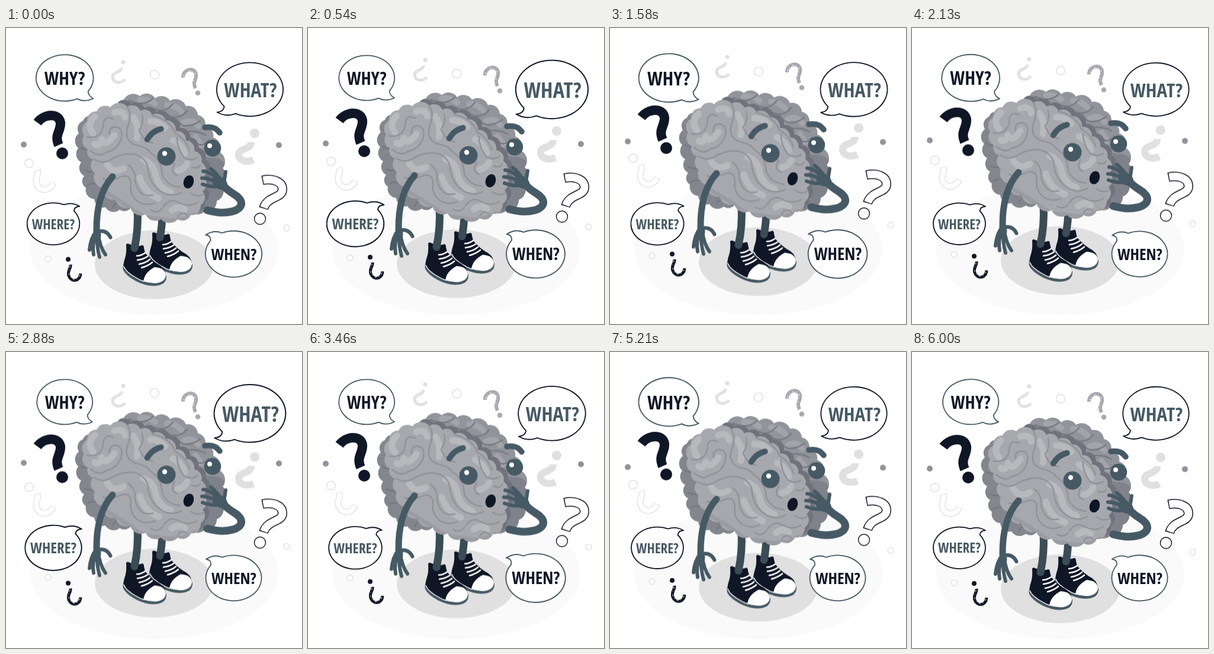
These frames come from a looping animation (500x500 px, 6.04 s). An HTML page:

```html
<!DOCTYPE html>
<html lang="en">
<head>
<meta charset="utf-8">
<title>Puzzled brain</title>
<style>
  :root { --navy: #0f1626; --slate: #455a64; --grey: #92929b; --pale: #e0e0e0; }
  html, body { margin: 0; width: 100%; height: 100%; overflow: hidden; background: #fff; }
  svg { display: block; width: 100%; height: 100%; }

  .slow, .fast { animation: float 6040ms linear -45ms infinite; }
  .fast { animation-duration: 3020ms; }
  .bubble { animation: beat 6040ms linear -45ms infinite; transform-box: fill-box; transform-origin: center; }
  .bubble.b2 { animation-duration: 3020ms; }
  .bubble.b4 { animation-duration: 1510ms; }
  @keyframes float { 50% { transform: translateY(-10px); } }
  @keyframes beat {
    0%, 30%, 40%, 60%, 100% { transform: scale(1); }
    10%, 50% { transform: scale(1.1); }
  }

  .bubble path { fill: #fff; stroke-width: 1.8; stroke-linejoin: round; }
  .bubble text { text-anchor: middle; font-family: "Open Sans Condensed", "Open Sans", "Noto Sans", sans-serif; font-weight: 700; font-stretch: 75%; }
  .navy path { stroke: var(--navy); }
  .navy text { fill: var(--slate); }
  .slate path { stroke: var(--slate); }
  .slate text { fill: var(--navy); }

  .line { fill: none; stroke-linecap: round; stroke-linejoin: round; }
  .hook { fill: none; stroke: currentColor; }
  .hollow { fill: none; stroke: #fff; stroke-dashoffset: -1.6; stroke-dasharray: 96.8 200; }
  .scratch { fill: none; stroke: #fff; stroke-width: .9; stroke-dasharray: 3 4 1 5; }
  .dot { fill: currentColor; }
  .ring { fill: #fff; stroke: currentColor; stroke-width: 1.4; }
</style>
</head>
<body>
<svg viewBox="0 0 500 500">
  <defs>
    <path id="back"/>
    <path id="side"/>
    <path id="front"/>
    <clipPath id="backClip"><use href="#back"/></clipPath>
    <clipPath id="frontClip"><use href="#front"/></clipPath>
    <g id="shoe">
      <path fill="var(--slate)" d="M202 392Q196 400 198 409Q203 419 220 428Q240 438 257 435Q272 432 271 418Z"/>
      <path fill="var(--navy)" d="M203 366Q204 363 208 365Q220 371 230 367Q233 367 233 372L235 380Q244 391 255 398Q268 404 270 416Q270 428 255 431Q238 433 220 422Q202 412 199 403Q198 397 201 389Q204 380 203 366Z"/>
      <path fill="#fff" d="M251 404Q268 405 270 417Q270 428 255 431Q243 432 232 428Q234 413 251 404Z"/>
      <path class="line" stroke="#fff" stroke-width="1.4" d="M199 403Q203 413 220 422Q226 426 233 428"/>
      <path class="line" stroke="#fff" stroke-width="2.6" d="M221 385Q228 385 235 380M222 392Q232 391 239 386M225 399Q236 397 243 391M229 405Q240 402 247 396"/>
    </g>
  </defs>

  <ellipse cx="250.5" cy="374" rx="209.5" ry="111" fill="#fafafa"/>

  <g class="slow">
    <circle class="ring" color="#e0e0e0" cx="251" cy="79" r="7.5"/>
    <circle class="dot" color="#92929b" cx="30" cy="197" r="5"/>
    <circle class="dot" color="#92929b" cx="461" cy="198" r="5"/>
    <circle class="ring" color="#e0e0e0" cx="474" cy="338" r="5"/>
    <circle class="ring" color="#e0e0e0" cx="71" cy="390" r="5"/>
  </g>

  <g class="fast" color="#e0e0e0">
    <path class="hook" stroke-width="5" d="M195 67C195 76 180 74 180 83C181 93 193 95 201 87"/>
    <path class="scratch" d="M194 68C192 75 180 75 181 83C182 92 193 93 199 88"/>
    <circle class="dot" cx="198" cy="58" r="3.6"/>
    <path class="hook" stroke-width="12" d="M414 193C414 207 394 202 393 214C393 226 408 227 418 223"/>
    <circle class="dot" cx="420" cy="178" r="8"/>
    <path class="hook" stroke-width="11" d="M53 240C56 250 47 256 53 266C59 277 74 275 80 262"/>
    <path class="hollow" stroke-width="8.4" pathLength="100" d="M53 240C56 250 47 256 53 266C59 277 74 275 80 262"/>
    <circle class="ring" cx="39" cy="229" r="7.3"/>
  </g>
  <g class="fast" color="#a8a8b0">
    <path class="hook" stroke-width="6" d="M299 84C298 70 318 65 321 78C323 88 314 89 320 102"/>
    <path class="scratch" d="M300 82C300 71 317 68 320 78C321 87 313 90 319 101"/>
    <circle class="dot" cx="324" cy="110" r="4.3"/>
  </g>
  <g class="fast" color="#0f1626">
    <path class="hook" stroke-width="16" d="M53 160C64 145 89 143 92 160C93 175 81 180 89 198"/>
    <circle class="dot" cx="95" cy="212" r="10"/>
    <path class="hook" stroke-width="16" d="M433 257.5C450 254 467 259 467 273C467 288 441 284 435 305"/>
    <path class="hollow" stroke-width="13" pathLength="100" d="M433 257.5C450 254 467 259 467 273C467 288 441 284 435 305"/>
    <circle class="ring" cx="429" cy="322.500" r="9.500"/>
    <path class="hook" stroke-width="5" d="M109 400C110 407 103 410 106 419C110 430 125 429 126 415"/>
    <path class="scratch" d="M108 402C108 408 103 411 107 419C111 428 123 427 125 417"/>
    <circle class="dot" cx="105" cy="391" r="4"/>
  </g>

  <g class="slow">
    <ellipse cx="250.500" cy="400" rx="100.500" ry="58" fill="#e0e0e0"/>
    <use href="#shoe" x="44" y="-19"/>
    <use href="#shoe"/>
    <path class="line" stroke="#3a4c55" stroke-width="13" d="M264 310Q264 335 260 354M222 305Q224 340 217 372"/>

    <use href="#back" fill="#92949b"/>
    <g clip-path="url(#backClip)">
      <path class="line" stroke="#a2a4a9" stroke-width="10" d="M226 121Q240 119 252 128M272 130Q286 130 296 141M300 160Q315 152 325 166M280 158L292 171M320 184L330 198"/>
      <path class="line" stroke="#787b83" stroke-width="2.500" d="M208 123Q232 134 248 119M250 137Q268 145 282 128M270 146Q292 158 306 140M287 153Q300 176 328 157M300 177Q320 171 337 181M316 193Q332 203 342 190M338 220Q355 222 364 236M350 275Q360 282 364 276"/>
      <path fill="#7f828a" d="M340 220Q375 215 374 250L365 300Q345 318 325 312Z"/>
      <use href="#front" x="7" y="-5" fill="#70737c"/>
    </g>

    <use href="#side" fill="#84868e"/>
    <path class="line" stroke="#73767f" stroke-width="2" d="M132 240Q144 246 150 240M138 265Q152 258 162 272M154 291Q164 280 178 288M126 202Q134 208 140 203M180 303Q185 292 196 294"/>
    <use href="#front" fill="#a7a8ad"/>
    <g clip-path="url(#frontClip)" class="line">
      <path stroke="#9b9ca2" stroke-width="7" d="M163 275Q190 290 212 305Q230 322 255 322Q295 331 318 315"/>
      <path stroke="#b8b9bd" stroke-width="11" d="M150 150Q135 164 147 178M150 196Q158 202 162 188M183 143Q199 138 201 151M215 151Q226 167 221 186M171 231Q181 247 199 237M232 223Q250 230 253 250Q258 270 278 277M226 253Q234 279 258 288M244 158Q258 157 269 169M282 190Q297 197 302 213M290 241Q301 239 306 229M280 308Q292 299 302 307M183 181Q176 192 168 194"/>
      <path stroke="#919399" stroke-width="2.500" d="M137 184Q159 188 164 168Q164 146 181 154M142 207Q158 220 169 210Q187 207 194 189Q200 169 184 167Q173 169 175 180M205 134Q213 145 207 163Q197 188 217 197Q238 201 244 211Q263 223 264 249Q274 268 294 269M149 222Q166 232 181 220Q209 207 226 217Q241 226 240 242Q245 268 266 279Q282 286 296 278M164 255Q180 259 195 251Q211 247 211 264Q208 281 222 293Q238 302 252 295M207 232Q220 242 218 259Q225 288 248 282M230 147Q234 160 225 173Q232 192 248 194M247 148Q278 155 286 178Q304 188 310 207M289 185Q288 202 301 219Q313 226 323 219M285 229Q276 244 289 249M314 235Q325 239 328 232M312 279Q323 287 334 281M266 302Q277 286 292 295Q308 304 323 295M245 308Q255 315 264 305M290 320Q296 308 306 316"/>
    </g>

    <path class="line" stroke="var(--slate)" stroke-width="9.500" d="M238.500 188.500Q247 174 262 170.500M336 168Q353 165 361 177"/>
    <circle cx="271" cy="217" r="15.500" fill="var(--slate)"/>
    <circle cx="268" cy="212" r="4.200" fill="#fff"/>
    <circle cx="349" cy="203" r="14.300" fill="var(--slate)"/>
    <circle cx="344" cy="199" r="4" fill="#fff"/>
    <ellipse cx="308.500" cy="260" rx="8.500" ry="11.300" fill="var(--navy)" transform="rotate(18 308.500 260)"/>

    <g class="line" stroke="var(--slate)">
      <path stroke-width="13" d="M340 308C372 317 402 309 397 293C393 282 378 280 367 266"/>
      <path stroke-width="6" d="M364 264Q348 243 333 242M362 263Q345 254 331 253.500M364 267Q347 270 332 264M364 258Q354 244 346 238M368 262L371 243"/>
      <path stroke-width="11" d="M180 251Q152 282 153 344"/>
      <path stroke-width="6" d="M152 344Q143 355 141 375M152 348Q145 366 148 383M154 348Q153 370 158 387M156 348Q158 369 168 383M154 344Q170 340 176.500 354"/>
    </g>
    <ellipse cx="361" cy="262" rx="14" ry="10" fill="var(--slate)" transform="rotate(30 361 262)"/>
    <ellipse cx="154" cy="350" rx="6.500" ry="9" fill="var(--slate)"/>
  </g>

  <g class="bubble slate b4">
    <path d="M137.500 106.300A47 38 0 1 0 119.400 118.600Q131 125 146 118Q138 114 137.500 106.300Z"/>
    <text x="99.200" y="96" font-size="31" data-w="67">WHY?</text>
  </g>
  <g class="bubble navy">
    <path d="M369 132.400A55.700 45 0 1 1 388 144.400Q372 150.500 357 142Q368 141 369 132.400Z"/>
    <text x="413" y="116.500" font-size="33" data-w="89">WHAT?</text>
  </g>
  <g class="bubble navy">
    <path d="M114.500 309A44 35.200 0 1 1 98 298.700Q112 294 124 301.500Q115 302 114.500 309Z"/>
    <text x="80" y="339.500" font-size="23.500" data-w="72">WHERE?</text>
  </g>
  <g class="bubble slate b2">
    <path d="M346 359.800A47 38.500 0 1 0 365 346.800Q352 341 338 350Q347 351 346 359.800Z"/>
    <text x="385" y="391.500" font-size="27.500" data-w="76">WHEN?</text>
  </g>
</svg>
<script>
  // Closed outline of round bumps between the given notches, listed clockwise.
  function scallop(id, notches) {
    const pts = notches.split(' ').map(p => p.split(',').map(Number));
    let d = 'M' + pts[0];
    pts.forEach(([x, y], i) => {
      const [nx, ny] = pts[(i + 1) % pts.length];
      const r = 0.65 * Math.hypot(nx - x, ny - y);
      d += `A${r} ${r} 0 0 1 ${nx} ${ny}`;
    });
    document.getElementById(id).setAttribute('d', d + 'Z');
  }

  scallop('back', '186,140 199,121 226,115 252,119 277,123 304,132 324,147 336,167 350,185 360,209 366,237 365,266 356,292 334,311 310,308 250,200');
  scallop('side', '220,250 212,302 192,307 168,303 149,289 135,270 132,250 127,227 122,203 123,178 130,157 148,150');
  scallop('front', '137,158 153,141 176,134 205,133 227,140 247,147 270,156 287,174 304,190 318,208 330,227 334,252 332,276 329,299 312,316 290,323 262,323 236,315 210,303 185,290 162,270 150,245 147,222 138,205 132,182');

  // Lettering keeps its place in the bubble if a wider face is used.
  for (const t of document.querySelectorAll('text')) {
    const size = +t.getAttribute('font-size');
    t.setAttribute('font-size', size * Math.min(1, t.dataset.w / t.getComputedTextLength()));
  }
</script>
</body>
</html>
```
